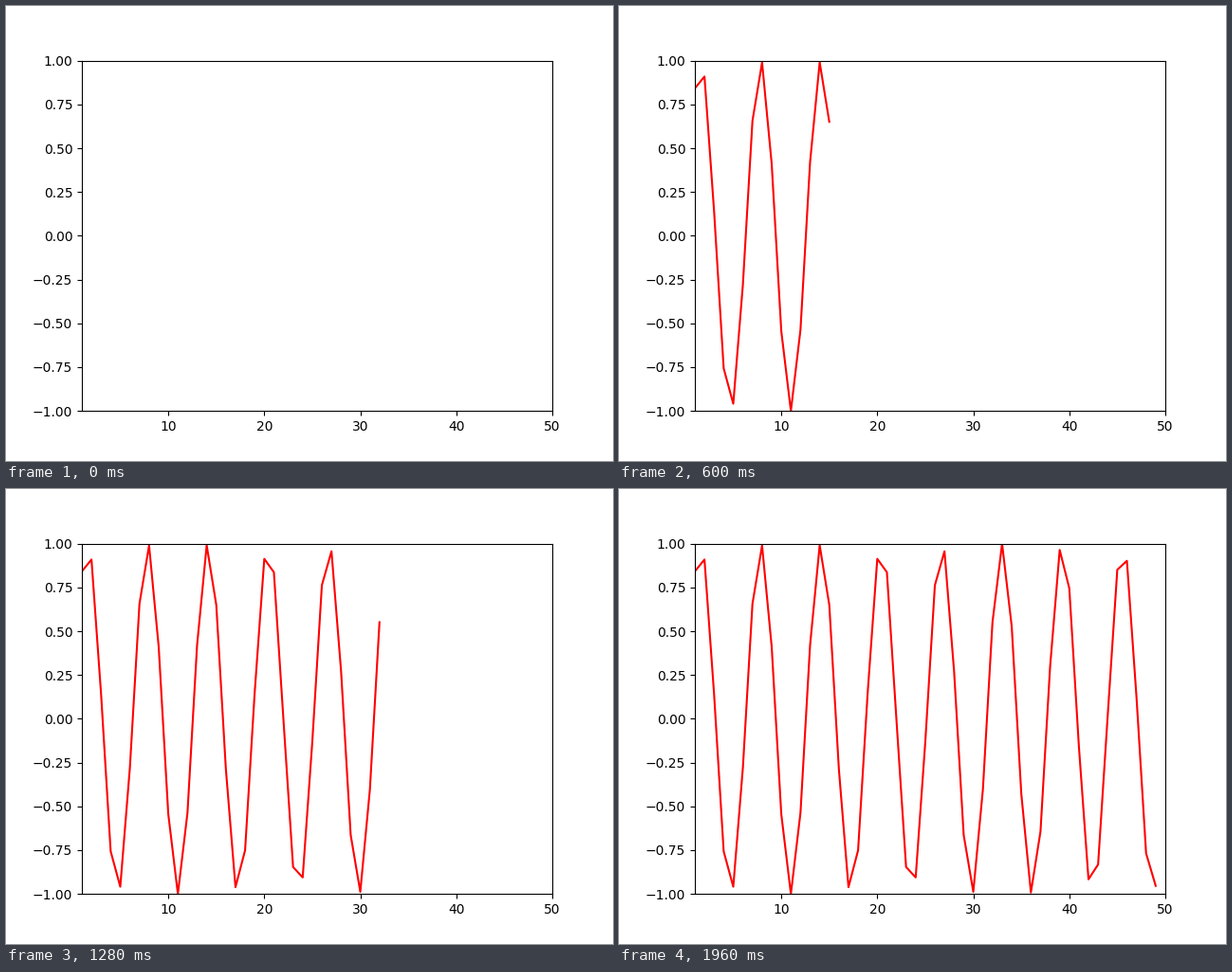
A matplotlib script that plays this animation: 640 px wide and 480 px high, repeating every 2 s.

```python
import matplotlib.pyplot as plt
import numpy as np
from matplotlib.animation import FuncAnimation

FRAMES = 50
INTERVAL = 40  # ms

fig, ax = plt.subplots(figsize=(6.4, 4.8), dpi=100)
ax.set_xlim(1, 50)
ax.set_ylim(-1, 1)
line, = ax.plot([], [], color="red", lw=1.5)

x = np.arange(FRAMES)
y = np.sin(x)


def update(i):
    """Reveal the sampled sine up to x = i."""
    line.set_data(x[:i + 1], y[:i + 1])
    return line,


anim = FuncAnimation(fig, update, frames=FRAMES, interval=INTERVAL,
                     repeat=True, repeat_delay=0, blit=False)

plt.show()
```
